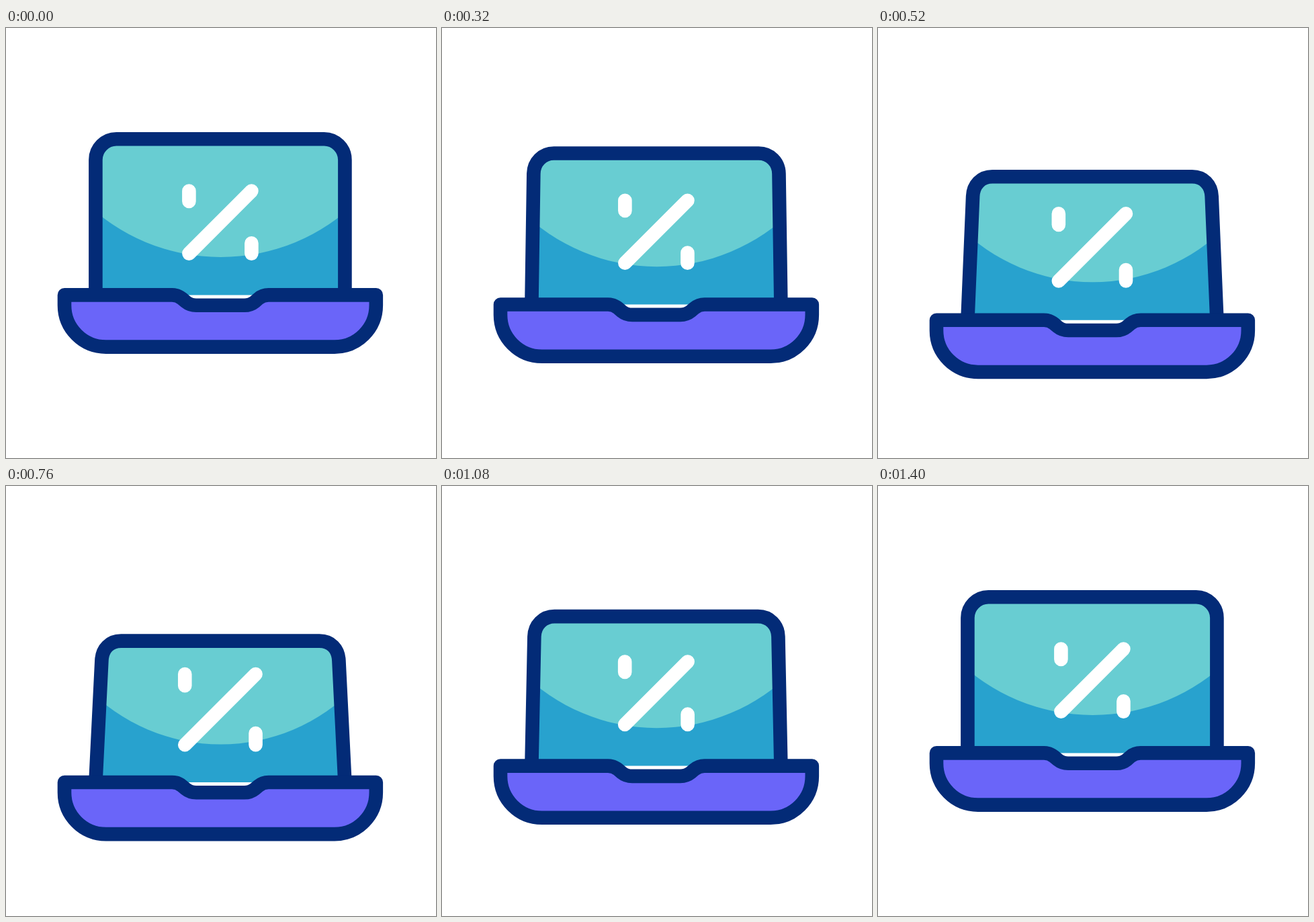
Animation of 640 by 640 pixels, one loop 1.52 s. Source, as an HTML page:

```html
<!DOCTYPE html>
<html lang="en">
<head>
<meta charset="utf-8">
<title>Laptop discount icon</title>
<style>
  html, body { margin: 0; width: 100%; height: 100%; overflow: hidden; background: #fff; }
  svg { display: block; width: 100%; height: 100%; }
</style>
</head>
<body>
<svg viewBox="0 0 640 640" fill="none" stroke-width="20.6" stroke-linecap="round" stroke-linejoin="round">
  <clipPath id="screenClip"><path class="screen"/></clipPath>
  <path class="screen" fill="#28a2ce"/>
  <g clip-path="url(#screenClip)"><ellipse id="shine" cx="319.5" ry="290.5" fill="#68cdd2"/></g>
  <path class="screen" stroke="#032b77" stroke-linecap="butt"/>
  <path id="percent" stroke="#fff"/>
  <path id="base" fill="#6a65f9" stroke="#032b77" d="M87 397.4H247
    c5.6 0 11 2 15.3 5.6l5.2 4.4c4.3 3.5 9.8 5.3 15.5 5.3H354.8
    c5.7 0 11.2-1.8 15.5-5.3l5.2-4.4c4.3-3.6 9.7-5.6 15.3-5.6H550.8
    V412.8a61.8 61.8 0 0 1-61.8 61.8H148.8A61.8 61.8 0 0 1 87 412.8Z"/>
</svg>
<script>
const LOOP = 1520, STEP = 40, PEAK = 720, CENTER = 318.9;
const $ = id => document.getElementById(id);
const screens = document.querySelectorAll('.screen');
const mirror = x => 2 * CENTER - x;

// Symmetric cubic-bezier(k, 0, 1 - k, 1)
function ease(x, k = 0.52) {
  let lo = 0, hi = 1;
  for (let i = 0; i < 24; i++) {
    const s = (lo + hi) / 2, r = 1 - s;
    if (3 * k * s * r * r + 3 * (1 - k) * s * s * r + s ** 3 < x) lo = s; else hi = s;
  }
  return lo * lo * (3 - 2 * lo);
}

// Rises from 0 to 1 at PEAK and falls back over the same time
const pulse = (t, span) => {
  const u = 1 - Math.abs(t - PEAK) / span;
  return u > 0 ? ease(u) : 0;
};

function screenPath(d) {
  const bottom = 397.4 + d, top = 165.3 + 1.5 * d;
  const sideX = 133.4 + 0.207 * d, sideY = 196.2 + 1.45 * d;
  const topX = 164.3 + 0.16 * d;
  const c1x = sideX + 0.02 * d, c1y = sideY - 17, c2x = topX - 17;
  return `M133.4 ${bottom}L${sideX} ${sideY}C${c1x} ${c1y} ${c2x} ${top} ${topX} ${top}` +
    `H${mirror(topX)}C${mirror(c2x)} ${top} ${mirror(c1x)} ${c1y} ${mirror(sideX)} ${sideY}` +
    `L${mirror(133.4)} ${bottom}`;
}

function percentPath(y, scale) {
  const r = 46.5 * scale, dot = 15.3 * scale, left = CENTER - r, right = CENTER + r;
  return `M${left} ${y + r}L${right} ${y - r}M${left} ${y - r}v${dot}M${right} ${y + r}v${-dot}`;
}

function draw(now) {
  const t = Math.floor(now % LOOP / STEP) * STEP;
  const drop = 43.75 * pulse(t, 680);
  const path = screenPath(drop);
  screens.forEach(s => s.setAttribute('d', path));
  $('shine').setAttribute('cy', 50.5 + drop);
  $('shine').setAttribute('rx', 290.5 * (1 - 0.00055 * drop));
  $('percent').setAttribute('d', percentPath(289.1 + drop, 1 + 0.134 * pulse(t, 430)));
  $('base').setAttribute('transform', `translate(0 ${drop})`);
}

function tick() {
  draw(performance.now());
  requestAnimationFrame(tick);
}
tick();
</script>
</body>
</html>
```
